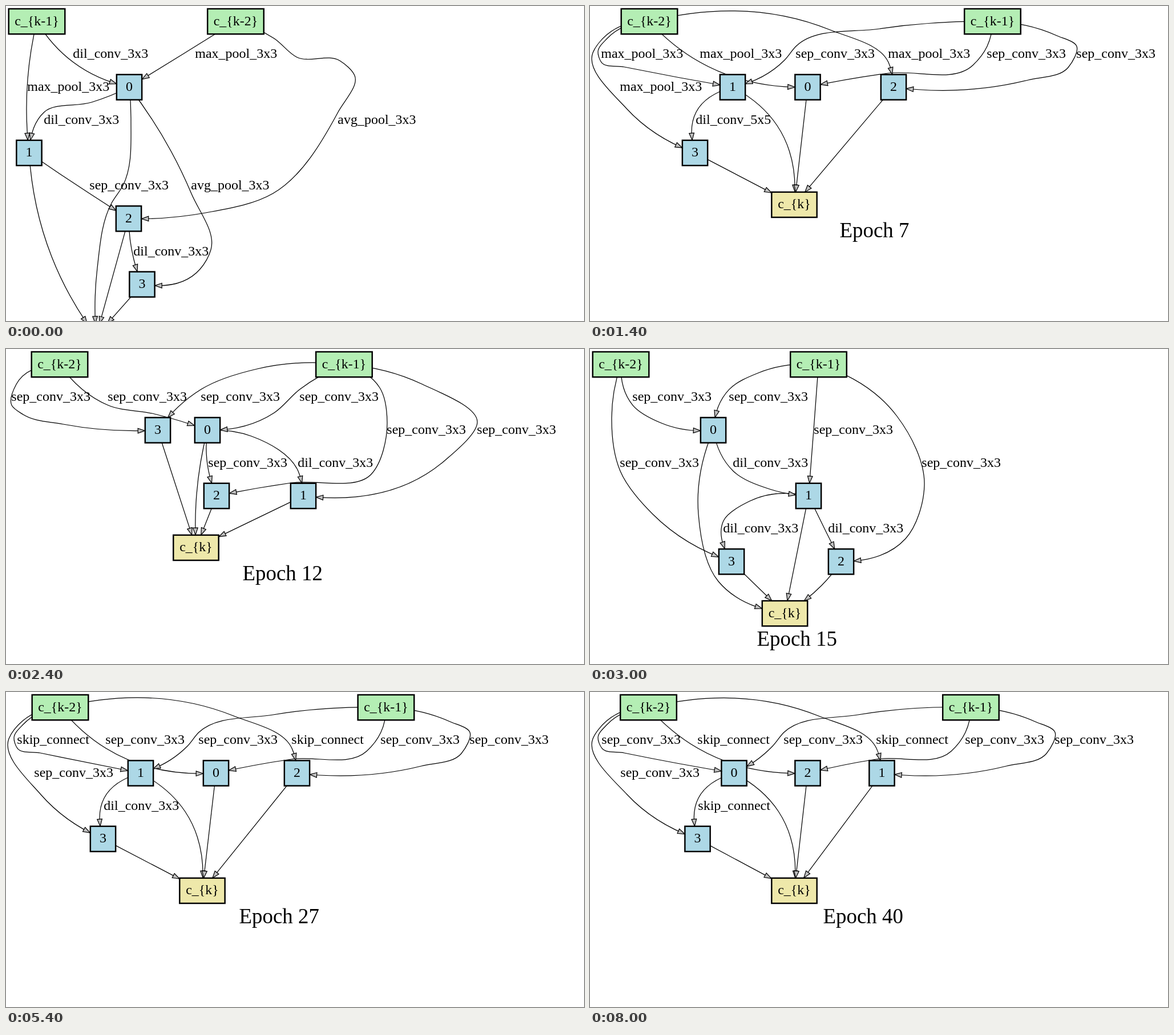
Write an HTML page that moves like this. It is 1013 px wide and 553 px high and loops after 9200 ms.

```html
<!DOCTYPE html>
<html lang="en">
<head>
<meta charset="utf-8">
<title>Cell search</title>
<style>
html, body { margin: 0; width: 100%; height: 100%; overflow: hidden; background: #fff; }
svg { display: block; font: 24px "Liberation Serif", "Times New Roman", serif; }
.node { stroke: #000; stroke-width: 2.46; }
.edge { fill: none; stroke: #000; stroke-width: 1.23; }
.head { fill: #c0c0c0; stroke: #000; stroke-width: 1.23; }
.mid { text-anchor: middle; }
.epoch { font-size: 36.9px; }
</style>
</head>
<body>
<svg id="stage" width="1013" height="553" viewBox="0 0 1013 553"></svg>
<script>
const STEP = 200, LAST = 40, LOOP = 9200;
const BOX = 44.3, ARROW = 12.3, ARROW_HALF = 4.3, LABEL_HALF = 14;
const OPS = {
  sep: 'sep_conv_3x3', dil: 'dil_conv_3x3', dil5: 'dil_conv_5x5',
  max: 'max_pool_3x3', avg: 'avg_pool_3x3', skip: 'skip_connect'
};
const rankY = r => 27.1 + 115.4 * r;
const lerp = (a, b, t) => a + (b - a) * t;
const lines = s => s.trim().split(/\s*[;\n]\s*/).map(l => l.split(/\s+/));

// Nodes are "name x rank". Edges are "from>to [operation labelX labelRank] [bends]",
// where the bend * is the corner of the label that the edge touches.
const graphs = [
  {
    from: 0, epochX: 250,
    nodes: 'k-1 54 0; k-2 402.5 0; 0 216 1; 1 40.5 2; 2 215 3; 3 238.5 4; k 158 4.788',
    edges: `
      k-1>0 dil 118 .5 *
      k-2>0 max 332 .5 *
      k-1>1 max 38 1 *
      0>1 dil 67 1.5 150,169 *
      k-2>2 avg 582 1.5 470,57 510,90 585,96 611,122 * 468,329 350,363
      1>2 sep 147 2.5 *
      0>3 avg 325 2.5 * 359,428 340,462
      2>3 dil 224 3.5 *
      0>k 219,200 205,315 185,346 160,460
      1>k 80,440
      2>k
      3>k`
  },
  wide(4, 438, '102', [104, 705.5, 250, 381.5, 532, 184, 358],
    'max 20; max 193; sep 361; max 523; sep 696; sep 853; max 53; dil5 186'),
  {
    from: 10, epochX: 415,
    nodes: 'k-2 94 0; k-1 592.5 0; 3 266 1; 0 353 1; 2 369 2; 1 521 2; k 333 2.788',
    edges: `
      k-2>3 sep 10 .5 18,62 * 30,115 100,132
      k-2>0 sep 179 .5 * 260,114
      k-1>3 sep 342 .5 440,35 *
      k-1>0 sep 515 .5 * 470,112
      k-1>2 sep 668 1 655,68 * 640,220 500,235
      k-1>1 sep 826 1 730,62 * 770,195
      0>2 sep 355 1.5 *
      0>1 dil 512 1.5 430,153 *
      0>k 333,270
      1>k
      2>k
      3>k`
  },
  {
    from: 13, epochX: 293,
    nodes: 'k-2 54 0; k-1 400.5 0; 0 216 1; 1 383 2; 3 248 3; 2 440 3; k 341.5 3.788',
    edges: `
      k-2>0 sep 75 .5 * 125,130
      k-2>3 sep 53 1.5 38,120 * 110,290
      k-1>0 sep 244 .5 295,42 *
      k-1>1 sep 393 1 *
      k-1>2 sep 582 1.5 538,118 586,240 553,333
      0>1 dil 251 1.5 * 315,246
      1>3 dil 234 2.5 280,267 *
      1>2 dil 418 2.5 *
      0>k 190,290 225,408
      1>k
      2>k 406,415
      3>k`
  },
  {
    from: 20, epochX: 330,
    nodes: 'k-2 167.5 0; k-1 532 0; 0 101 1; 1 359 1; 3 208 2; 2 415.5 2; k 313.5 2.788',
    edges: `
      k-2>0 sep 10 .5 50,50 * 30,119
      k-2>3 sep 183 1 *
      k-2>1 skip 209 .5 * 245,113 300,117
      k-1>0 sep 361 .5 420,43 * 300,112 190,112
      k-1>1 sep 522 .5 * 460,130
      k-1>2 sep 654 1 640,45 671,82 * 540,218
      1>3 dil 210 1.5 270,168 *
      1>2 dil 394 1.5 *
      0>k 165,270
      1>k
      2>k 380,303
      3>k`
  },
  wide(25, 409, '102', [95, 666, 236, 368, 510, 170, 344],
    'skip 20; sep 175; sep 338; skip 501; sep 657; sep 813; sep 50; dil 172'),
  wide(37, 409, '021', [102.5, 667.5, 252.5, 381.5, 511.5, 188.5, 358],
    'sep 21; skip 189; sep 340; skip 502; sep 658; sep 815; sep 54; skip 190')
];

// The layout with three nodes side by side: bends follow from node and label places.
function wide(from, epochX, [a, b, c], xs, labelText) {
  const names = ['k-2', 'k-1', a, b, c, 3, 'k'], ranks = [0, 0, 1, 1, 1, 2, 2.788];
  const nodes = names.map((name, i) => `${name} ${xs[i]} ${ranks[i]}`).join(';');
  const labels = lines(labelText);
  const x = labels.map(l => +l[1]);
  const tag = i => `${labels[i].join(' ')} ${[.5, .5, .5, .5, .5, .5, 1, 1.5][i]}`;
  const edges = `
    k-2>${a} ${tag(0)} 30,57 14,80 * 60,107
    k-2>${b} ${tag(1)} *
    k-1>${a} ${tag(2)} ${xs[1] - 198},40 * ${x[2] - 20},95
    k-2>${c} ${tag(3)} ${xs[4] - 111},42 *
    k-1>${b} ${tag(4)} * ${x[4] - 25},104 ${xs[4] - 10},118
    k-1>${c} ${tag(5)} ${x[5] - 35},52 * ${x[5] - 15},108 ${x[5] - 85},130
    k-2>3 ${tag(6)} 30,50 5,82 ${x[6] + 11},180
    ${a}>3 ${tag(7)} *
    ${a}>k ${xs[2] + 78},210
    ${b}>k
    ${c}>k
    3>k`;
  return { from, epochX, nodes, edges };
}

// Smooth curve through the points, weighted by the length of each stretch.
function curve(p) {
  const n = p.length - 1, len = [], dir = [], tan = [];
  for (let i = 0; i < n; i++) {
    const d = [0, 1].map(k => p[i + 1][k] - p[i][k]);
    len[i] = Math.hypot(...d);
    dir[i] = d.map(v => v / len[i]);
  }
  if (n === 1) return `M${p[0]}L${p[1]}`;
  for (let i = 1; i < n; i++) {
    const t = len[i - 1] / (len[i - 1] + len[i]);
    tan[i] = [0, 1].map(k => lerp(dir[i - 1][k], dir[i][k], t));
  }
  tan[0] = dir[0].map((v, k) => 2 * v - tan[1][k]);
  tan[n] = dir[n - 1].map((v, k) => 2 * v - tan[n - 1][k]);
  let d = 'M' + p[0];
  for (let i = 0; i < n; i++) {
    const a = p[i].map((v, k) => v + tan[i][k] * len[i] / 3);
    const b = p[i + 1].map((v, k) => v - tan[i + 1][k] * len[i] / 3);
    d += `C${a} ${b} ${p[i + 1]}`;
  }
  return d;
}

// Arrowhead whose tip is where the curve enters the node.
function arrow(d, node) {
  const path = document.createElementNS('http://www.w3.org/2000/svg', 'path');
  path.setAttribute('d', d);
  let at = path.getTotalLength(), tip;
  do {
    tip = path.getPointAtLength(at -= 0.5);
  } while (at > 0 && Math.abs(tip.x - node.x) < node.w / 2 && Math.abs(tip.y - node.y) < BOX / 2);
  const base = path.getPointAtLength(at - ARROW);
  const s = ARROW_HALF / ARROW, wx = (base.y - tip.y) * s, wy = (tip.x - base.x) * s;
  return `<path class="head" d="M${tip.x},${tip.y}L${base.x + wx},${base.y + wy}L${base.x - wx},${base.y - wy}Z"/>`;
}

function readNode([name, x, rank]) {
  const [w, fill] = name === 'k' ? [79.4, '#eee8aa']
    : name[0] === 'k' ? [98.6, '#b4eeb4'] : [BOX, '#add8e6'];
  return { name, x: +x, y: rankY(+rank), w, fill, text: name[0] === 'k' ? `c_{${name}}` : name };
}

function readEdge([ends, ...rest], nodes) {
  const [a, b] = ends.split('>').map(name => nodes.find(n => n.name === name));
  let label = '', corner;
  if (OPS[rest[0]]) {
    const [op, lx, rank] = rest.splice(0, 3);
    const x = +lx, y = rankY(+rank);
    corner = [x, y + LABEL_HALF * Math.sign(b.x - a.x)];
    label = `<text x="${x - 0.7}" y="${y + 6.5}">${OPS[op]}</text>`;
  }
  const bends = rest.map(p => p === '*' ? corner : p.split(',').map(Number));
  const d = curve([[a.x, a.y], ...bends, [b.x, b.y]]);
  return { line: `<path class="edge" d="${d}"/>`, head: arrow(d, b), label };
}

function drawNode({ x, y, w, fill, text }) {
  return `<rect class="node" x="${x - w / 2}" y="${y - BOX / 2}" width="${w}" height="${BOX}" fill="${fill}"/>` +
    `<text class="mid" x="${x}" y="${y + 6.5}">${text}</text>`;
}

function drawGraph(epoch) {
  const g = graphs.filter(c => c.from <= epoch).pop();
  const nodes = lines(g.nodes).map(readNode);
  const edges = lines(g.edges).map(e => readEdge(e, nodes));
  const layer = key => edges.map(e => e[key]).join('');
  const epochY = nodes[nodes.length - 1].y + 57;
  return layer('line') + nodes.map(drawNode).join('') + layer('head') + layer('label') +
    `<text class="epoch" x="${g.epochX - 0.5}" y="${epochY}">Epoch ${epoch}</text>`;
}

const stage = document.getElementById('stage');
let shown = -1;
function tick() {
  const epoch = Math.min(LAST, Math.floor(performance.now() % LOOP / STEP));
  if (epoch !== shown) stage.innerHTML = drawGraph(shown = epoch);
  requestAnimationFrame(tick);
}
tick();
</script>
</body>
</html>
```
